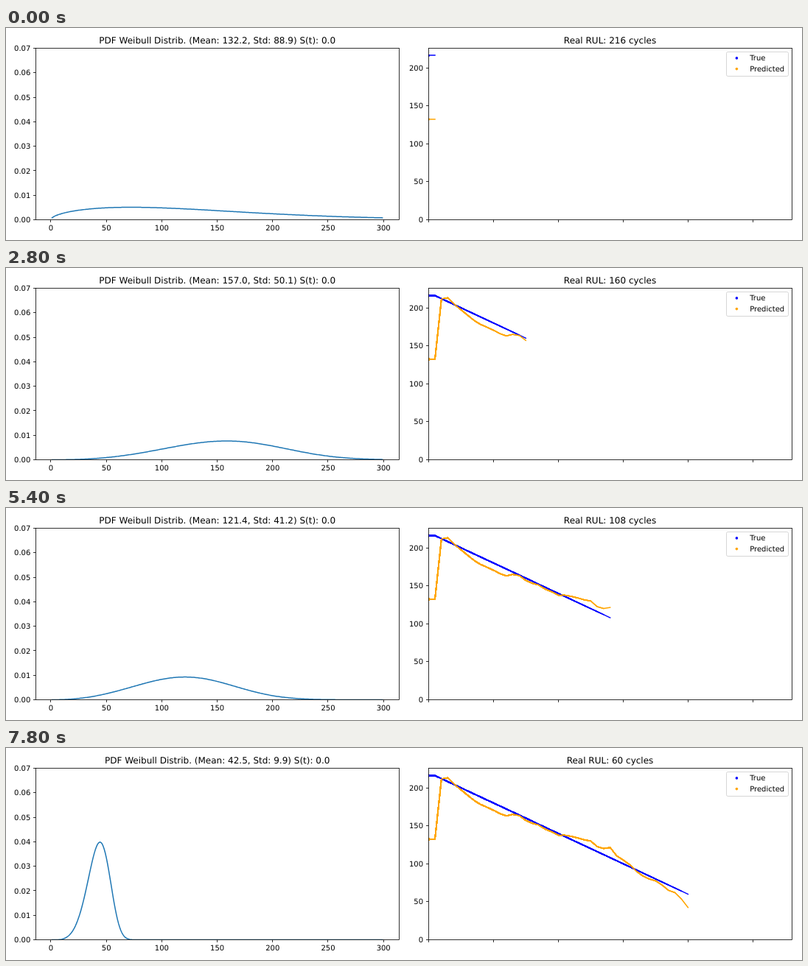
An HTML page for the animation above (8000 ms loop, 1080x288 px).

```html
<!DOCTYPE html>
<html lang="en">
<head>
<meta charset="utf-8">
<title>Weibull remaining useful life</title>
<style>
  html, body { margin: 0; width: 100%; height: 100%; overflow: hidden; background: #fff; }
  svg { display: block; width: 1080px; height: 288px; }
  text { font: 10px "DejaVu Sans", sans-serif; text-rendering: geometricPrecision; white-space: pre; }
  .title { font-size: 12px; text-anchor: middle; }
  .axis { fill: none; stroke: #000; stroke-width: .8; }
  .line { fill: none; stroke-width: 1.5; stroke-linecap: square; stroke-linejoin: round; }
</style>
</head>
<body>
<svg id="stage" viewBox="0 0 1080 288"></svg>
<script>
const STEP_MS = 200, STEPS = 40;
const TOP = 27.4, BASE = 260.5, LEFT = 40.4, RIGHT = 573.2, WIDTH = 493;
const TRUE_COLOR = 'blue', PRED_COLOR = 'orange';

// Predicted remaining cycles, one per step.
const means = [
  132.2, 211.5, 213, 204.5, 197.5, 190.5, 183.5, 178.2, 174.5, 170.5,
  166, 163, 165, 163.5, 157, 153.3, 151, 145.5, 142.2, 137.6,
  137.6, 136, 134, 131.5, 130, 122.5, 120, 121.4, 110.5, 105,
  99, 90.5, 84.1, 80, 77.5, 72, 65, 62, 53.5, 42.5
];
// [step, standard deviation]; the ratio to the mean is interpolated.
const spreads = [[0, 88.9], [1, 64], [7, 54.8], [14, 50.1], [19, 45.4], [27, 41.2], [32, 26.1], [39, 9.9]];

const stage = document.getElementById('stage');

function add(parent, tag, attrs, text) {
  const node = document.createElementNS('http://www.w3.org/2000/svg', tag);
  for (const name in attrs) node.setAttribute(name, attrs[name]);
  if (text !== undefined) node.textContent = text;
  return parent.appendChild(node);
}

const pdfX = v => LEFT + 20.9 + (v - .2) * 1.504;
const pdfY = v => BASE - v * (BASE - TOP) / .07;
const rulX = i => RIGHT + i * 8.803;
const rulY = v => BASE - v * 1.0325;
const actual = step => 216 - 4 * step;
const pixel = v => Math.floor(v) + .5;
const path = points => points.map(p => p[0].toFixed(2) + ',' + p[1].toFixed(2)).join(' ');

function spread(step) {
  let n = 1;
  while (spreads[n][0] < step) n++;
  const [a, sa] = spreads[n - 1], [b, sb] = spreads[n];
  const ra = sa / means[a], rb = sb / means[b];
  return means[step] * (ra + (rb - ra) * (step - a) / (b - a));
}

// Stirling series, shifted upwards for accuracy.
function gamma(x) {
  let shift = 1;
  while (x < 9) shift *= x++;
  return Math.sqrt(2 * Math.PI / x) * Math.pow(x / Math.E, x) *
    Math.exp(1 / (12 * x) - 1 / (360 * x ** 3)) / shift;
}

function weibull(mean, std) {
  const want = 1 + (std / mean) ** 2;
  let low = .5, high = 20;
  for (let n = 0; n < 50; n++) {
    const mid = (low + high) / 2;
    if (gamma(1 + 2 / mid) / gamma(1 + 1 / mid) ** 2 > want) low = mid;
    else high = mid;
  }
  const shape = low, scale = mean / gamma(1 + 1 / shape);
  return v => shape / scale * (v / scale) ** (shape - 1) * Math.exp(-((v / scale) ** shape));
}

function clip(id, x) {
  const node = add(stage, 'clipPath', { id });
  add(node, 'rect', { x, y: TOP - .4, width: WIDTH, height: BASE - TOP + .4 });
}

function axes(x) {
  add(stage, 'rect', { class: 'axis', x: pixel(x), y: 27.5, width: WIDTH, height: 233 });
}

function xTick(x, label) {
  add(stage, 'path', { class: 'axis', d: `M${pixel(x)} 260.5v3.5` });
  if (label !== undefined) add(stage, 'text', { x, y: 275, 'text-anchor': 'middle' }, label);
}

function yTick(x, y, label) {
  add(stage, 'path', { class: 'axis', d: `M${pixel(x)} ${pixel(y)}h-3.5` });
  add(stage, 'text', { x: x - 7.1, y: Math.round(y + 3.6), 'text-anchor': 'end' }, label);
}

clip('pdfArea', 40);
clip('rulArea', 573);

const curve = add(stage, 'polyline', { class: 'line', stroke: '#1f77b4', 'clip-path': 'url(#pdfArea)' });

// Each step draws its whole history again over the earlier ones.
const history = add(stage, 'g', { 'clip-path': 'url(#rulArea)' });
const layers = means.map((_, step) => {
  const layer = add(history, 'g', {});
  for (const [color, value] of [[TRUE_COLOR, actual], [PRED_COLOR, s => means[s]]]) {
    const points = [];
    for (let i = 0; i <= step + 1; i++) {
      const y = rulY(value(Math.max(0, i - 1)));
      points.push([rulX(i), step ? y : Math.floor(y)]);
    }
    add(layer, 'polyline', { class: 'line', stroke: color, points: path(points) });
    add(layer, 'circle', { cx: RIGHT, cy: rulY(value(0)), r: 1.8, fill: color });
  }
  return layer;
});

axes(LEFT);
axes(RIGHT);
for (let v = 0; v <= 300; v += 50) xTick(pdfX(v), v);
for (let n = 0; n <= 7; n++) yTick(LEFT, pdfY(n / 100), (n / 100).toFixed(2));
for (let i = 0; i <= 50; i += 10) xTick(rulX(i));
for (let v = 0; v <= 200; v += 50) yTick(RIGHT, rulY(v), v);

add(stage, 'rect', {
  x: 977.5, y: 32.5, width: 84, height: 33, rx: 2,
  fill: '#fff', 'fill-opacity': .8, stroke: '#ccc', 'stroke-opacity': .8
});
[['True', TRUE_COLOR, 40.9], ['Predicted', PRED_COLOR, 55.6]].forEach(([label, color, y]) => {
  add(stage, 'circle', { cx: 991.4, cy: y, r: 1.8, fill: color });
  add(stage, 'text', { x: 1009.2, y: Math.round(y + 3.3) }, label);
});

const pdfTitle = add(stage, 'text', { class: 'title', x: 286.7, y: 21 });
const rulTitle = add(stage, 'text', { class: 'title', x: 819.5, y: 21 });

let shown = -1;
function render(time) {
  const step = Math.floor(time / STEP_MS) % STEPS;
  if (step === shown) return;
  shown = step;
  const mean = means[step], std = spread(step), density = weibull(mean, std);
  const points = [];
  for (let v = 1; v < 300; v++) points.push([pdfX(v), pdfY(density(v))]);
  curve.setAttribute('points', path(points));
  layers.forEach((layer, n) => layer.setAttribute('display', n <= step ? 'inline' : 'none'));
  pdfTitle.textContent = `PDF Weibull Distrib. (Mean: ${mean.toFixed(1)}, Std: ${std.toFixed(1)}) S(t): 0.0`;
  rulTitle.textContent = `Real RUL: ${actual(step)} cycles`;
}

function tick() {
  render(performance.now());
  requestAnimationFrame(tick);
}
render(0);
requestAnimationFrame(tick);
</script>
</body>
</html>
```
